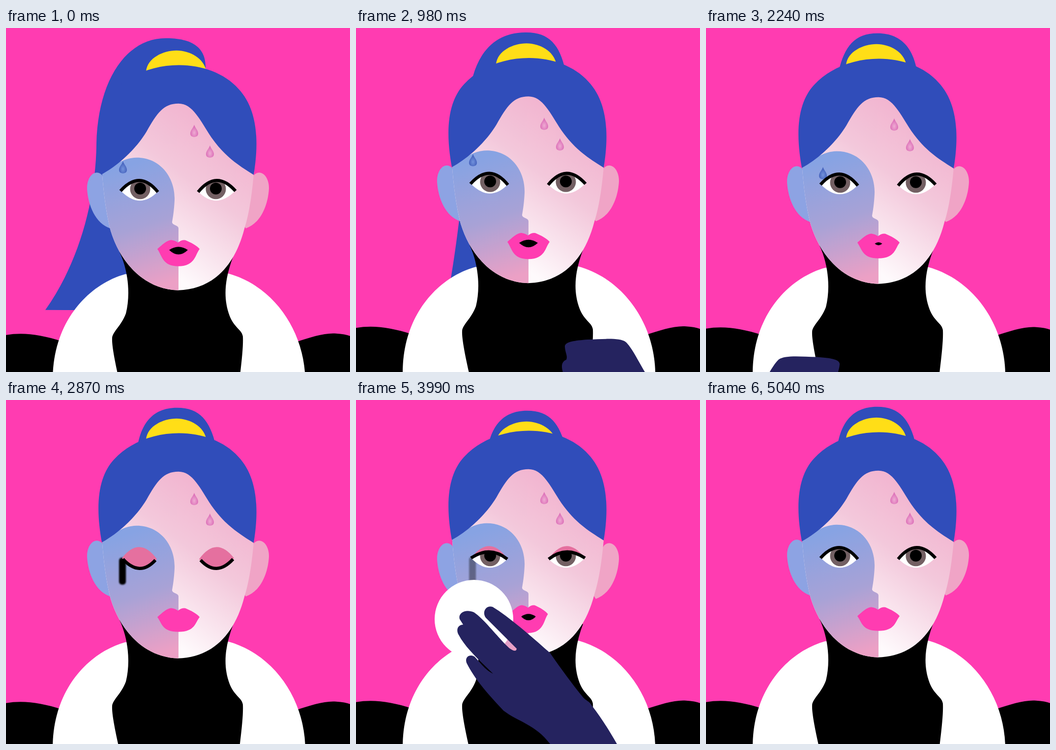
Animation, 700 px wide and 700 px high, one loop 5250 ms. Source, as an HTML page:

```html
<!DOCTYPE html>
<html lang="en">
<head>
<meta charset="utf-8">
<title>Workout and cleanse</title>
<style>
  html, body { margin: 0; width: 100%; height: 100%; overflow: hidden; background: #ff3cb1; }
  svg { display: block; width: 100vw; height: 100vh; }
</style>
</head>
<body>
<svg viewBox="0 0 700 700">
  <defs>
    <linearGradient id="skin" gradientUnits="userSpaceOnUse" x1="430" y1="190" x2="256" y2="422">
      <stop offset="0" stop-color="#f2b5d0"/><stop offset=".4" stop-color="#f3c8db"/><stop offset="1" stop-color="#fefafc"/>
    </linearGradient>
    <linearGradient id="shade" gradientUnits="userSpaceOnUse" x1="230" y1="270" x2="310" y2="510">
      <stop offset="0" stop-color="#87a3e3"/><stop offset=".5" stop-color="#a8a2d6"/><stop offset="1" stop-color="#eca0c5"/>
    </linearGradient>
    <radialGradient id="pinkDrop" cy=".65"><stop offset="0" stop-color="#efabd3"/><stop offset="1" stop-color="#dc70b8"/></radialGradient>
    <radialGradient id="blueDrop" cy=".65"><stop offset="0" stop-color="#7292dc"/><stop offset="1" stop-color="#4663bd"/></radialGradient>
    <filter id="soft" x="-100%" width="300%"><feGaussianBlur stdDeviation="1.8"/></filter>
    <path id="drop" d="M0 0C2 7 8 11 8 18C8 23 4 25 0 25C-4 25-8 23-8 18C-8 11-2 7 0 0Z"/>
    <path id="faceShape" d="M350 518C280 516 232 460 213 397C201 350 197 300 195 270C230 60 470 60 505 270C502 310 496 360 485 393C465 470 420 516 350 518Z"/>
    <path id="ear" d="M195 283C180 270 164 288 165 312C167 345 182 382 212 392L240 350Z"/>
    <path id="fistShape" fill="#25235f" d="M100 710C125 670 138 640 152 627C165 618 195 621 230 622C255 624 277 626 276 637C275 650 270 655 273 663C285 668 284 680 276 700V760H90Z"/>
    <clipPath id="faceClip"><use href="#faceShape"/></clipPath>
    <clipPath id="eyeClip"><path id="opening"/></clipPath>
    <g id="eye">
      <g clip-path="url(#eyeClip)">
        <path fill="#fff" d="M220 270H320V350H220Z"/>
        <circle cx="273" cy="312" r="20.5" fill="#736063"/>
        <circle cx="273" cy="311" r="12"/>
      </g>
      <path id="lidSkin" fill="#e5709f"/>
      <path id="lash" fill="none" stroke="#000" stroke-width="6.5"/>
    </g>
  </defs>

  <rect width="700" height="700" fill="#ff3cb1"/>
  <g id="figure">
    <g id="bun">
      <path id="pony" fill="#304dba"/>
      <path fill="#ffde17" d="M285 72C288 45 320 30 347 30S402 46 407 70L346 85Z"/>
    </g>
    <path d="M0 609C35 603 70 608 115 622V740H0ZM585 625C620 613 650 604 672 606Q690 607 700 611V740H585Z"/>
    <path fill="#fff" d="M243 485C170 505 95 580 95 700V740H609V700C607 600 545 510 453 484Z"/>
    <path d="M231 440C250 480 253 530 244 565C235 590 217 602 216 615C215 630 222 665 231 705V740H470L475 700C480 660 483 630 482 612C480 598 465 595 455 570C440 530 447 490 462 450Z"/>
    <g id="ears">
      <use href="#ear" fill="#8da3e3"/>
      <use href="#ear" fill="#f0a4c6" transform="matrix(-1 0 0 1 700 0)"/>
    </g>
    <g id="face">
      <use href="#faceShape" fill="url(#skin)"/>
      <path clip-path="url(#faceClip)" fill="url(#shade)" d="M195 282C220 260 245 248 266 248C315 248 345 290 343 335C342 355 340 368 338 379C338 386 351 385 351 392V520H180V282Z"/>
      <path fill="#304dba" d="M195 282C180 200 190 145 220 113C285 43 415 43 473 108C508 145 517 205 504 283C470 262 445 245 418 207C395 172 380 138 351 138C320 138 307 158 286 195C268 225 235 260 195 282Z"/>
      <g id="mouth">
        <path id="lips" fill="#ff3cb1"/>
        <path id="gap" d="M-19 0Q0-13 19 0Q0 18-19 0Z"/>
      </g>
    </g>
    <use href="#drop" x="383" y="181" fill="url(#pinkDrop)"/>
    <use href="#drop" x="415" y="223" fill="url(#pinkDrop)"/>
    <use id="tear" href="#drop" x="238" fill="url(#blueDrop)"/>
    <rect id="streak" x="230" y="313" width="14" rx="6" filter="url(#soft)"/>
    <use href="#eye"/>
    <use href="#eye" transform="matrix(-1 0 0 1 700 0)"/>
  </g>
  <use id="leftFist" href="#fistShape"/>
  <g transform="matrix(-1 0 0 1 700 0)"><use id="rightFist" href="#fistShape"/></g>
  <g id="wipe">
    <circle cx="240" cy="446" r="80" fill="#fff"/>
    <path fill="#25235f" d="M531 700C515 672 500 648 480 622C474 612 468 612 462 605C440 578 418 548 395 515C365 488 310 440 278 421C264 417 256 432 264 443L327 506Q326 515 312 505C290 485 260 445 240 432C222 424 207 434 211 446L218 457C205 458 204 470 209 478C222 503 250 529 279 557C262 549 252 533 241 522C230 516 221 524 225 535C245 575 280 610 300 632C330 655 365 660 395 700L460 830H610Z"/>
  </g>
</svg>
<script>
const LOOP = 5250, STEP = 70, LAST = 5040;
const el = Object.fromEntries([...document.querySelectorAll('[id]')].map(n => [n.id, n]));
const set = (name, key, value) => el[name].setAttribute(key, value);
const move = (name, x, y) => set(name, 'transform', `translate(${x} ${y})`);
const lerp = (a, b, k) => a + (b - a) * k;
const smooth = k => k * k * (3 - 2 * k);

// Eased value at time t along [time, value] stops
function track(t, ...stops) {
  const i = stops.findIndex(s => s[0] > t);
  if (i === 0) return stops[0][1];
  if (i < 0) return stops[stops.length - 1][1];
  const [t0, a] = stops[i - 1], [t1, b] = stops[i];
  return lerp(a, b, smooth((t - t0) / (t1 - t0)));
}

// Hair swung sideways by k: 0 is a neat bun, 1 is a full swing to the left
function ponyPath(k) {
  const mix = k => (x0, y0, x1, y1) => `${lerp(x0, x1, k)} ${lerp(y0, y1, k)} `;
  const inner = mix(k ** 3), outer = mix(Math.min(1, 1.2 * k)), tip = mix(k);
  return 'M' + inner(427, 85, 406, 70)
    + 'C' + inner(415, 35, 410, 15) + inner(395, 8, 365, 5) + inner(348, 8, 325, 5)
    + 'C' + outer(295, 8, 245, 5) + outer(275, 45, 187, 90) + outer(268, 85, 184, 220)
    + 'C' + outer(262, 200, 183, 330) + outer(255, 420, 150, 460) + tip(250, 540, 80, 558)
    + 'L' + tip(300, 545, 260, 559) + 'L350 300Z';
}

function drawEyes(closed) {
  const lid = lerp(272, 353, closed);
  set('opening', 'd', `M233 315Q272 ${lid} 309 317Q272 355 233 315Z`);
  set('lidSkin', 'd', `M236 314Q272 268 307 316Q272 ${lid} 236 314Z`);
  const inset = 5 * closed;
  set('lash', 'd', `M${233 + inset} 316Q272 ${lid} ${309 - inset} 318`);
}

function drawMouth(open, tilt) {
  const low = 464 + 5 * open + 4 * tilt;
  set('lips', 'd', `M308 434C318 425 330 414 338 416Q345 417 350 421Q357 415 365 416C375 420 390 428 394 434C385 445 385 ${low} 351 ${low}C318 ${low} 318 448 308 434Z`);
  set('gap', 'transform', `translate(351 ${436 + 3 * tilt}) scale(${open})`);
  const narrow = 1 - .08 * tilt;
  set('mouth', 'transform', `translate(${351 * (1 - narrow)} ${-tilt}) scale(${narrow} 1)`);
}

function drawFist(name, lift) {
  move(name, -10 * (1 - lift), 119 * (1 - lift));
}

function draw(t) {
  const stride = t / 840 * 2 * Math.PI;
  const effort = track(t, [560, 10], [1400, 8], [2240, 6], [2870, 4], [3150, 0]);
  const swing = Math.cos(stride) * track(t, [300, 1], [2400, 0]);
  const tilt = track(t, [3300, 0], [3750, 1], [4400, 1], [4800, 0]);

  move('figure', 0, 5.7 + effort * Math.cos(2 * stride));
  move('bun', 0, 8 * tilt);
  move('ears', 0, 7 * tilt);
  move('face', 0, -3 * tilt);
  set('pony', 'd', ponyPath(Math.abs(swing)));
  set('pony', 'transform', swing < 0 ? 'matrix(-1 0 0 1 697 0)' : '');

  // Arms pump in turn
  const pump = Math.sin(stride) / .866 * effort / 10;
  drawFist('leftFist', -pump);
  drawFist('rightFist', pump);

  drawEyes(track(t, [1330, 0], [1400, .12], [1540, 1], [1680, 0], [2520, 0], [2730, 1],
    [3220, 1], [3430, .22], [4340, .22], [4620, 0]));
  drawMouth(track(t, [2030, 1], [2240, .4], [2450, 0], [3500, 0], [3920, .85], [4060, .85], [4480, 0]), tilt);

  // The sweat drop runs into the eye and smears the make-up
  set('tear', 'y', track(t, [1960, 255], [2240, 280], [2450, 300]));
  set('tear', 'opacity', track(t, [2310, 1], [2450, 0]));
  set('streak', 'height', track(t, [2450, 0], [2870, 55]));
  set('streak', 'opacity', t < 2450 ? 0 : track(t, [3640, 1], [3990, .38], [4270, 0]));

  // The pad comes in, rubs in circles and leaves
  const away = track(t, [3360, 1], [3780, 0], [4410, 0], [4760, 1]);
  const turn = (t - 3990) / 560 * 2 * Math.PI;
  const rub = 30 * (1 - away);
  move('wipe', 190 * away + rub * (1 - Math.cos(turn)), 360 * away - rub * Math.sin(turn));
}

function frame(now) {
  draw(Math.min(LAST, Math.floor(now % LOOP / STEP) * STEP));
  requestAnimationFrame(frame);
}
draw(0);
requestAnimationFrame(frame);
</script>
</body>
</html>
```
